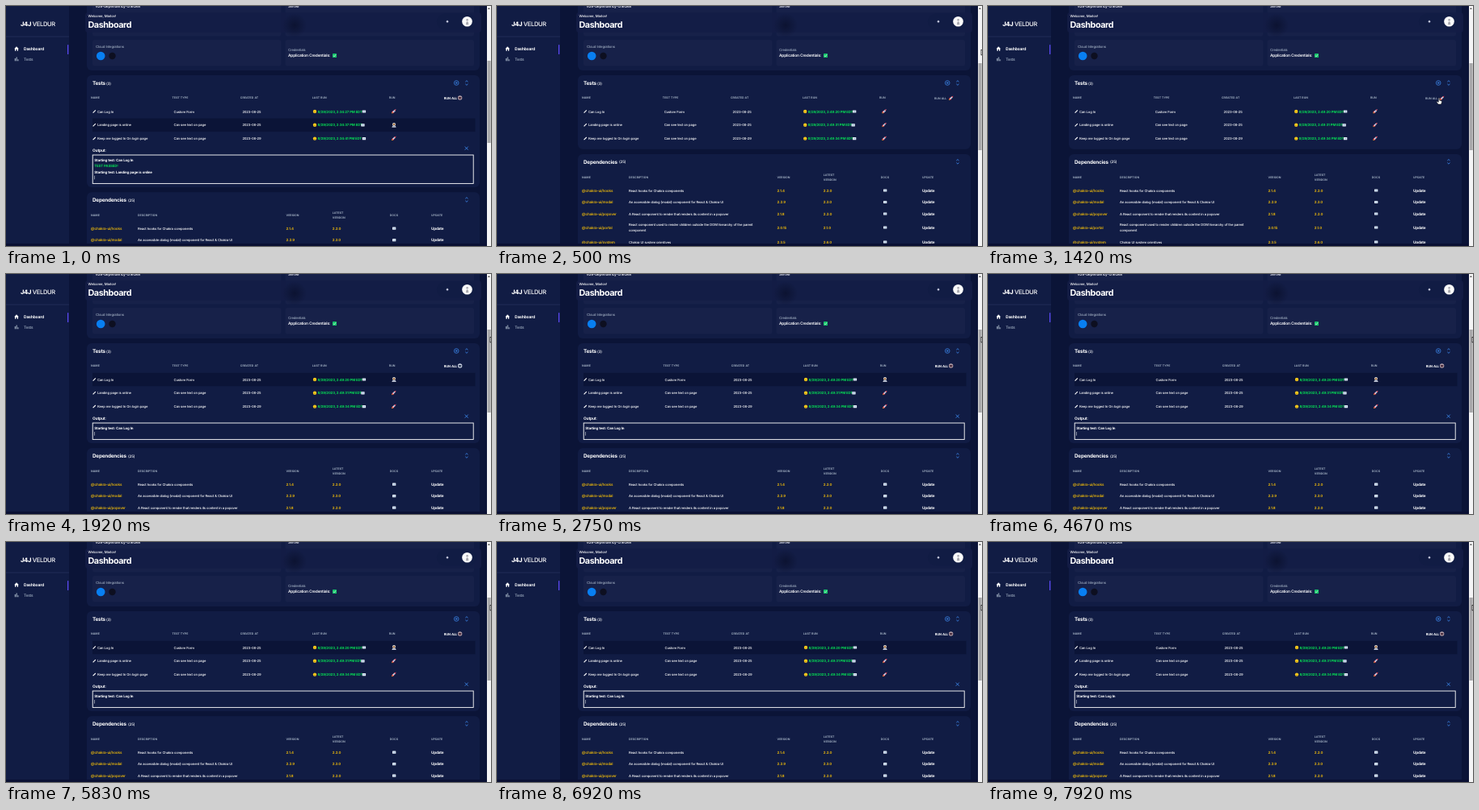
Animation of 600 by 298 pixels, one loop 8 s. Source, as an HTML page:

```html
<!DOCTYPE html>
<html lang="en">
<head>
<meta charset="utf-8">
<title>Test dashboard</title>
<style>
  html, body { margin: 0; width: 100%; height: 100%; overflow: hidden; background: #0b1437; }
  svg { display: block; width: 100%; height: 100%; }
  text {
    font-family: Inter, "Open Sans", sans-serif;
    letter-spacing: -.04em;
    word-spacing: .05em;
    text-rendering: geometricPrecision;
    white-space: pre;
  }
  .head { letter-spacing: .01em; }
</style>
</head>
<body>
<svg id="stage" viewBox="0 0 600 298"></svg>
<script>
const LOOP = 8000, CLEARED = 250, CLICKED = 1670;
const WHITE = '#fff', GREY = '#a0aec0', GOLD = '#e6b40c', GREEN = '#06dc55', BLUE = '#3b86ea';
const PAGE = '#0b1437', PANEL = '#111c44', TILE = '#172149';

// y is the middle of the capitals
const label = (x, y, text, size = 4.2, fill = WHITE, weight = 550, cls = '') =>
  `<text x="${x}" y="${y + size * .36}" font-size="${size}" fill="${fill}" font-weight="${weight}" class="${cls}">${text}</text>`;
const heading = (x, y, text) => label(x, y, text, 3.5, GREY, 700, 'head');
const rect = (x, y, w, h, fill, r = 0, more = '') =>
  `<rect x="${x}" y="${y}" width="${w}" height="${h}" rx="${r}" fill="${fill}" ${more}/>`;
const circle = (x, y, r, fill, more = '') => `<circle cx="${x}" cy="${y}" r="${r}" fill="${fill}" ${more}/>`;
const line = (d, stroke, width = .7) => `<path d="${d}" fill="none" stroke="${stroke}" stroke-width="${width}"/>`;
const shape = (d, fill) => `<path d="${d}" fill="${fill}"/>`;
const at = (x, y, content, id = '') => `<g ${id && `id="${id}"`} transform="translate(${x} ${y})">${content}</g>`;

const rocket = (x, y) => at(x, y,
  shape('M-2.6 .6L-.8 -.9L.7 .7L-.5 2.5Z', '#e02940') +
  shape('M2.8 -2.8Q.2 -2.6 -1.5 .5L-.5 1.5Q2.6 -.1 2.8 -2.8Z', '#dfe3ee') +
  shape('M2.8 -2.8L.7 -2.1L2.1 -.7Z', '#e02940') +
  circle(.5, -.5, .5, '#3d76a8') + circle(-1.8, 1.8, .7, '#f0a52b'));
const astronaut = (x, y) => at(x, y,
  shape('M-2.7 3Q-2.4 .5 0 .5T2.7 3Z', '#c9cdd8') +
  circle(0, -.9, 2, '#e8e6e2') + circle(0, -.8, 1.3, '#a87546') + rect(-.8, 1.4, 1.6, .8, '#6f87b0'));
const helmet = (x, y, shell, visor) => at(x, y,
  circle(0, 0, 2.7, shell) + shape('M-1.9 -.6Q0 -2 1.9 -.6V.5Q0 1.6 -1.9 .5Z', visor) +
  rect(-1, 1.5, 2, .7, visor));
const card = (x, y) => rect(x, y - 1.6, 4.3, 3.2, '#eef4fb', .3) + rect(x + .9, y - .5, 2.6, 1, '#86a9d2');
const collapse = y => line(`M568.3 ${y - 1.3}l1.6 -1.5l1.6 1.5M568.3 ${y + 1.3}l1.6 1.5l1.6 -1.5`, BLUE, .9);
const pencil = y => line(`M107.6 ${y + 1.6}L110.8 ${y - 1.6}`, WHITE, 1.1);

const tests = [
  ['Can Log In', 'Custom Form', '2023-08-25'],
  ['Landing page is online', 'Can see text on page', '2023-08-25'],
  ['Keep me logged In On login page', 'Can see text on page', '2023-08-29']
];
const packages = [
  ['hooks', 'React hooks for Chakra components', '2.1.4', '2.2.0', 45],
  ['modal', 'An accessible dialog (modal) component for React &amp; Chakra UI', '2.2.9', '2.3.0', 59.5],
  ['popover', 'A React component to render that renders its content in a popover', '2.1.8', '2.2.0', 74],
  ['portal', 'React component used to render children outside the DOM hierarchy of the parent|component', '2.0.15', '2.1.0', 91],
  ['system', 'Chakra UI system primitives', '2.3.5', '2.6.0', 109]
];

function frame() {
  return '<defs><radialGradient id="smudge"><stop stop-color="#070c24" stop-opacity=".6"/>' +
    '<stop offset="1" stop-color="#070c24" stop-opacity="0"/></radialGradient></defs>' +
    rect(0, 0, 600, 298, PAGE) + rect(0, 0, 78, 298, PANEL) +
    `<text x="18" y="25.2" font-size="7.5" fill="${WHITE}" font-weight="800">J4J <tspan font-weight="550">VELDUR</tspan></text>` +
    rect(0, 37.7, 78, .6, '#2b3660') +
    shape('M10.2 53.2L13 50.3L15.8 53.2H15V55.7H13.7V53.8H12.3V55.7H11V53.2Z', WHITE) +
    label(22, 53, 'Dashboard', 5, WHITE, 700) + rect(76, 48, 1.3, 12, '#5a48f0', .6) +
    rect(10.8, 65, 1.1, 3.3, GREY) + rect(12.6, 63.5, 1.1, 4.8, GREY) + rect(14.4, 66.3, 1.1, 2, GREY) +
    label(22, 66, 'Tests', 4.8, GREY, 450);
}

function overview() {
  const tile = (x, y, h) => rect(x, y, 233.5, h, TILE, 3);
  return rect(100, -12, 486, 92, PANEL, 6) +
    tile(107, -12, 49.5) + tile(345.5, -12, 49.5) + tile(107, 42, 32.5) + tile(345.5, 42, 32.5) +
    label(111, .6, 'e2e-dependency-checker', 4.8) + label(349, .6, 'Server', 4.8) +
    rect(98, 8, 490, 25, '#131d46', 4, 'opacity=".85"') + circle(357, 24, 15, 'url(#smudge)') +
    label(101.5, 12.8, 'Welcome, Marlon!', 4.3) + label(101.5, 22.8, 'Dashboard', 10.8, WHITE, 700) +
    rect(533, 9.5, 49, 20, PANEL, 10) +
    circle(546, 19.3, 1.1, WHITE) + line('M546 17.5v3.6M544.2 19.3h3.6', '#aeb3d6', .5) +
    circle(570.5, 19.3, 6.3, '#fafafa') + circle(570.6, 17.2, 1.3, '#a9a9b0') +
    shape('M569 23.2Q569 19.2 570.6 19.2T572.2 23.2Z', '#a9a9b0') +
    label(111, 50.5, 'Cloud Integrations', 4.3, GREY, 450) + label(349, 54.5, 'Credentials', 4.3, GREY, 450) +
    circle(117.2, 62, 5.3, '#087ff2') + circle(131.5, 62, 4.2, '#0d0f20') +
    label(349, 61.5, 'Application Credentials:', 4.9, WHITE, 600) +
    rect(404, 59, 5, 5, '#15c56a', .6) + line('M405 61.5l1.1 1.2l1.9 -2.3', '#fff', .7);
}

function testPanel({ bottom, active, times, output }) {
  const running = active >= 0, shift = running ? .8 : 0;
  let s = rect(100, 86, 486, bottom - 86, PANEL, 6) +
    label(107, 95.5, 'Tests', 6.4, WHITE, 700) + label(124, 96, '(3)', 4.6, WHITE) +
    circle(557.2, 95.5, 2.8, 'none', `stroke="${BLUE}" stroke-width=".8"`) +
    line('M555.7 95.5h3M557.2 94v3', BLUE) + collapse(95.5) + heading(105, 114.1, 'NAME');
  [[204.8, 'TEST TYPE'], [289, 'CREATED AT'], [378, 'LAST RUN'], [473, 'RUN']]
    .forEach(([x, name]) => s += heading(x + shift, 114.1, name));
  s += running ? label(541.8, 114.2, 'RUN ALL', 4, WHITE, 700) : heading(541, 114.7, 'RUN ALL') + rocket(561.5, 114.5);
  tests.forEach(([name, type, created], i) => {
    const y = 131 + i * 16.8, x = shift;
    if (i === active) s += rect(107, y - 8.3, 473.5, 16.6, PAGE);
    s += pencil(y) + label(113, y, name) + label(206.7 + x, y, type) + label(291.6 + x, y, created) +
      circle(381.2 + x, y, 2.2, '#f7c91c') + line(`M${380.2 + x} ${y + .6}q1 .9 2 0`, '#8a6212', .4) +
      label(384.8 + x, y, `8/29/2023, ${times[i]} PM EDT`, 4.3, GREEN, 650) +
      card(i === 1 ? 438.5 + x : 440 + x, y) +
      (i === active ? astronaut(480, y) : rocket(478.8 + x, y));
  });
  if (!running) return s;
  s += label(107, 179, 'Output:', 4.9, WHITE, 700) + line('M567.7 174.6l4 4m0 -4l-4 4', BLUE, .9) +
    rect(107.2, 185, 471, bottom - 189.6, 'none', 0, 'stroke="#fff" stroke-width=".9"');
  output.forEach(([y, text, color]) => s += label(109.3, y, text, 4.4, color, 650));
  return s;
}

function packagePanel(top) {
  let s = rect(100, top, 486, 130, PANEL, 6) +
    label(107, top + 9.3, 'Dependencies', 6.4, WHITE, 700) + label(151, top + 9.8, '(25)', 4.6, WHITE) + collapse(top + 9.3);
  [[105, 28.5, 'NAME'], [163, 28.5, 'DESCRIPTION'], [346.5, 28.5, 'VERSION'], [403.8, 26, 'LATEST'],
   [403.8, 31.3, 'VERSION'], [474.8, 28.5, 'DOCS'], [526, 28.5, 'UPDATE']]
    .forEach(([x, y, name]) => s += heading(x, top + y, name));
  packages.forEach(([name, about, version, latest, dy]) => {
    const y = top + dy, lines = about.split('|');
    s += label(105, y, '@chakra-ui/' + name, 4.6, GOLD, 600);
    lines.forEach((part, i) => s += label(163, y + (i - (lines.length - 1) / 2) * 6.5, part));
    s += label(346.5, y, version, 4.4, GOLD, 650) + label(403.8, y, latest, 4.4, GOLD, 650) +
      card(478, y) + label(526, y, 'Update', 4.7, WHITE, 700);
  });
  return s;
}

const scene = (id, options) => {
  const [from, to] = options.thumb;
  return `<g id="${id}">${testPanel(options)}${packagePanel(options.bottom + 6.2)}` +
    rect(595, 0, 5, 298, '#f4f4f5') + rect(595.5, from, 4.2, to - from, '#a8a8aa') +
    shape('M596 4l1.4 -2l1.4 2Z', '#505050') + '</g>';
};

const started = 'Starting test: Can Log In';
const latestTimes = ['2:49:20', '2:49:31', '2:49:34'];
document.getElementById('stage').innerHTML = frame() + overview() +
  scene('second', {
    bottom: 225, active: 1, thumb: [68, 170], times: ['2:34:27', '2:34:37', '2:34:41'],
    output: [[191.3, started, WHITE], [198, 'TEST PASSED!', GREEN], [206.3, 'Starting test: Landing page is online', WHITE]]
  }) +
  scene('idle', { bottom: 177.8, active: -1, thumb: [71, 179], times: latestTimes }) +
  scene('first', { bottom: 210, active: 0, thumb: [69, 172], times: latestTimes, output: [[191.5, started, WHITE]] }) +
  rect(0, 295, 595, 3, '#0a1033') +
  `<g id="pale">${helmet(561.6, 114, '#d5dcea', '#34405f')}</g>` +
  `<g id="dark">${helmet(561.6, 114, '#b9a5ad', '#4a2e40')}</g>` +
  at(0, 0, rect(0, -2.3, .5, 4.6, WHITE), 'caret') +
  at(0, 0, '<path d="M0 0V7.2L1.7 5.6L2.8 8L3.9 7.5L2.8 5.2H5Z" fill="#fff" stroke="#000" stroke-width=".7"/>', 'arrow') +
  at(0, 0, '<path d="M-.7 -3.5Q0 -4.3 .7 -3.5V-.8L3.2 0Q3.7 .3 3.4 1.5L2.6 4H-1L-3 1.2Q-2.8 .3 -1.8 .7L-.7 1.4Z" fill="#fff" stroke="#000" stroke-width=".5"/>', 'hand');

const node = id => document.getElementById(id);
const show = (id, on) => node(id).setAttribute('visibility', on ? 'visible' : 'hidden');
const move = (id, x, y) => node(id).setAttribute('transform', `translate(${x} ${y})`);
const ease = (t, from, to) => {
  const p = Math.min(1, Math.max(0, (t - from) / (to - from)));
  return p * p * (3 - 2 * p);
};

function draw() {
  const t = performance.now() % LOOP;
  const second = t < CLEARED, first = t >= CLICKED, idle = !second && !first;
  show('second', second);
  show('idle', idle);
  show('first', first);
  show('pale', first && t < 2100);
  show('dark', second || t >= 2100);

  show('caret', second || first && (t - CLICKED) % 1000 < 500);
  move('caret', 109.5, second ? 213 : 198.3);

  // The pointer comes from the scroll bar, clicks "run all" and goes back.
  const near = ease(t, 850, 1350) - ease(t, CLICKED, 1900);
  const x = 599 - 41 * near, y = (first ? 81 : 57) + (first ? 37 : 61) * near;
  const over = near > .9;
  show('hand', over);
  show('arrow', !over && !second);
  move('hand', x, y);
  move('arrow', x, y - 3);
  requestAnimationFrame(draw);
}
draw();
</script>
</body>
</html>
```
